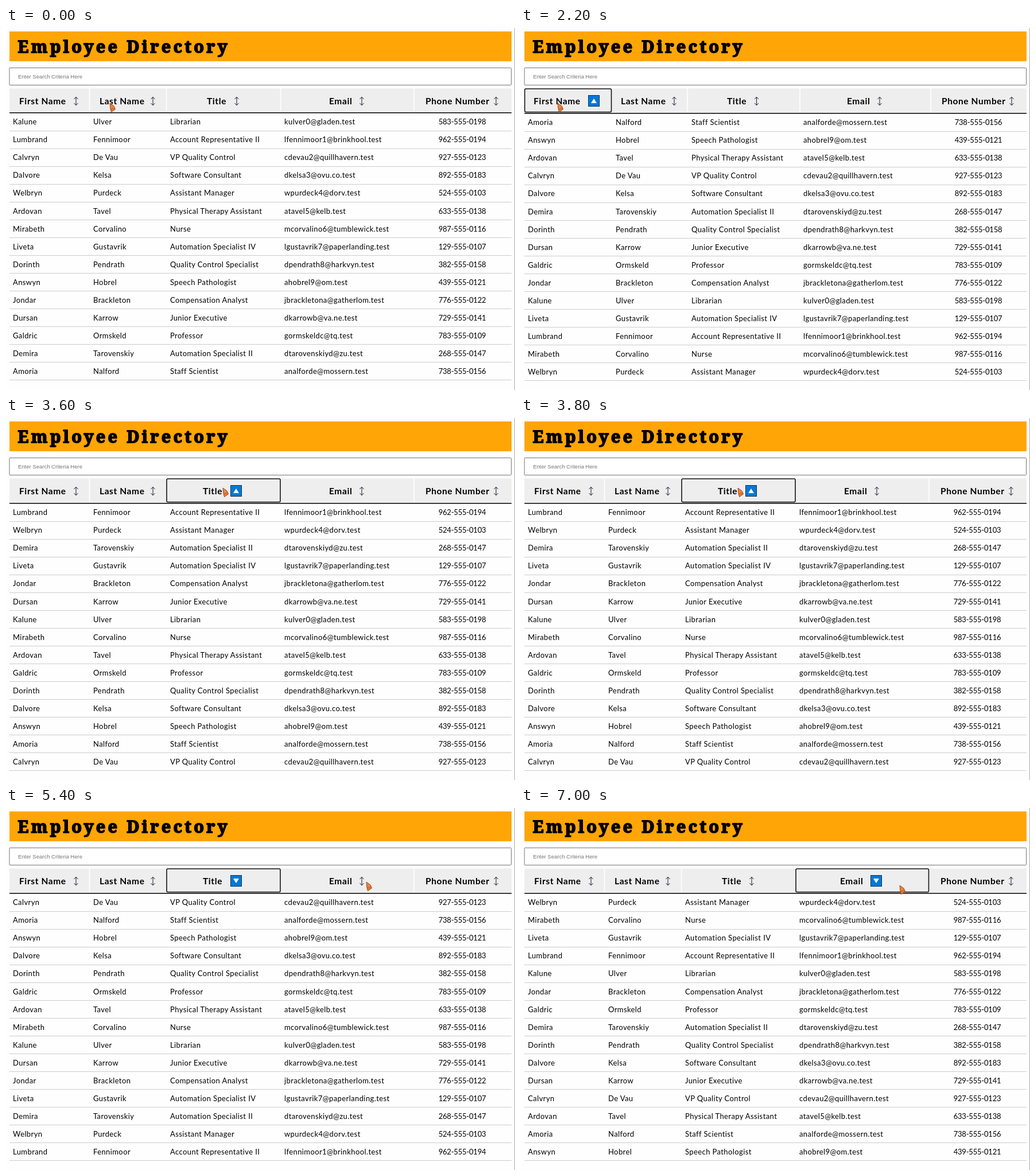
Write an HTML page that moves like this. It is 887 px wide and 631 px high and loops after 8 s.

```html
<!DOCTYPE html>
<html lang="en">
<head>
<meta charset="utf-8">
<title>Employee Directory</title>
<style>
  html, body { margin: 0; width: 100%; height: 100%; overflow: hidden; background: #fefefe; }
  svg { display: block; width: 887px; height: 631px; }
  text { font-family: Lato, sans-serif; fill: #000; white-space: pre; }
  .title { font: 700 29px "Noto Serif", serif; letter-spacing: 4.3px; stroke: #000; stroke-width: 1.8px; stroke-linejoin: round; }
  .hint { font: 9.5px "Liberation Sans", Arial, sans-serif; fill: #757575; }
  .head { font-size: 15.5px; font-weight: 700; letter-spacing: .6px; }
  .cell { font-size: 13px; letter-spacing: .4px; }
  .phone { letter-spacing: -.2px; text-anchor: middle; }
</style>
</head>
<body>
<svg viewBox="0 0 887 631">
  <rect x="6" y="6" width="875" height="52" fill="#ffa505"/>
  <text class="title" x="20.5" y="43">Employee Directory</text>
  <rect x="6" y="69.5" width="874.5" height="30" rx="1" fill="#fff" stroke="#767676"/>
  <text class="hint" x="21" y="87.5">Enter Search Criteria Here</text>
  <rect x="886" width="1" height="631" fill="#aaa"/>
  <g id="table"></g>
  <g id="cursor">
    <path d="M0 0 L7 5 L9.5 10.5 L2.5 15.5 L1 10 Z" fill="#ee843f" stroke="#94481c" stroke-linejoin="round"/>
    <path d="M1 10 L8.5 8 M2 11.5 L9 10" fill="none" stroke="#b85a24" stroke-width=".8"/>
  </g>
</svg>
<script>
const LOOP = 8000, STEP = 200;
const table = document.getElementById('table');
const cursor = document.getElementById('cursor');

// first | last | title | mail host | phone area | phone end
const people = `Kalune|Ulver|Librarian|gladen|583|98
Lumbrand|Fennimoor|Account Representative II|brinkhool|962|94
Calvryn|De Vau|VP Quality Control|quillhavern|927|23
Dalvore|Kelsa|Software Consultant|ovu.co|892|83
Welbryn|Purdeck|Assistant Manager|dorv|524|03
Ardovan|Tavel|Physical Therapy Assistant|kelb|633|38
Mirabeth|Corvalino|Nurse|tumblewick|987|16
Liveta|Gustavrik|Automation Specialist IV|paperlanding|129|07
Dorinth|Pendrath|Quality Control Specialist|harkvyn|382|58
Answyn|Hobrel|Speech Pathologist|om|439|21
Jondar|Brackleton|Compensation Analyst|gatherlom|776|22
Dursan|Karrow|Junior Executive|va.ne|729|41
Galdric|Ormskeld|Professor|tq|783|09
Demira|Tarovenskiy|Automation Specialist II|zu|268|47
Amoria|Nalford|Staff Scientist|mossern|738|56`.split('\n').map((line, i) => {
  const [first, last, title, host, area, end] = line.split('|');
  const user = (first[0] + last).toLowerCase().replace(' ', '') + i.toString(36);
  return [first, last, title, `${user}@${host}.test`, `${area}-555-01${end}`];
});

const names = ['First Name', 'Last Name', 'Title', 'Email', 'Phone Number'];
const normal = {
  edges: [6, 145.5, 279.5, 478.5, 711, 881],
  heads: [23, 163, 350, 563, 731],
  icons: [122, 256, 402, 620, 854],
  cells: [12, 152, 286, 485, 795]
};
const widened = {
  edges: [6, 158, 290, 486, 714, 881],
  heads: [22, 174, 359, 568, 733],
  icons: [127, 267, 410.5, 625, 855],
  cells: [12, 165, 297, 492, 797]
};

// start, focused column, sort direction
const states = [
  [0, -1, 0], [1400, 0, 0], [1600, 0, 1], [2600, 0, -1],
  [3600, 2, 1], [4400, 2, -1], [6000, 3, 1], [6600, 3, -1]
];
// time, x, y of the pointer tip
const path = [
  [0, 181, 131], [1200, 73, 128], [1400, 72, 128], [2200, 64, 131], [3000, 64, 131],
  [3600, 378, 122], [4600, 378, 122], [5400, 628, 129], [6000, 628, 129],
  [6600, 640, 130], [7000, 660, 135], [LOOP, 660, 135]
];

const text = (cls, x, y, s) => `<text class="${cls}" x="${x}" y="${y}">${s}</text>`;
const line = (y, h, color) => `<rect x="6" y="${y}" width="875" height="${h}" fill="${color}"/>`;

const arrows = x => `<path d="M${x} 120.5V134.5m-3.5 -3.5l3.5 3.8l3.5 -3.8m-7 -7l3.5 -3.8l3.5 3.8"
  fill="none" stroke="#21152c"/>`;

const badge = (x, dir) => `<rect x="${x - 9.5}" y="117.5" width="19" height="19" fill="#0078d7" stroke="#12304c"/>
  <path d="M${x - 5} ${127 + 4 * dir}h10l-5 ${-8 * dir}z" fill="#fff"/>`;

function drawTable([, col, dir]) {
  const at = col === 0 && dir ? widened : normal;
  const shift = dir ? 1 : 0;
  let out = line(105.5, 41.5 + shift, '#eee');
  at.edges.slice(1, 5).forEach(x => out += `<rect x="${x - .8}" y="105" width="1.6" height="42" fill="#fff"/>`);
  out += line(147 + shift, 1.5, '#000');

  names.forEach((name, i) => {
    const sorted = dir && i === col;
    const headX = at.heads[i] - (sorted && i ? 7 : 0);
    const iconX = at.icons[i] - (sorted && i ? 1 : 0);
    out += text('head', headX, 132.5, name) + (sorted ? badge(iconX, dir) : arrows(iconX));
  });
  if (col >= 0) {
    const left = at.edges[col] + .5, width = at.edges[col + 1] - left - .5;
    out += `<rect x="${left}" y="106" width="${width}" height="40.5" rx="2" fill="none" stroke="#101010" stroke-width="1.6"/>`;
  }

  const rows = [...people];
  if (dir) rows.sort((a, b) => (a[col] < b[col] ? -1 : 1) * dir);
  rows.forEach((row, r) => {
    const y = Math.round(168.2 + shift + r * 31.07);
    row.forEach((s, i) => out += text(i === 4 ? 'cell phone' : 'cell', at.cells[i], y, s));
    out += line(179 + shift + r * 31, 1, '#ccc');
  });
  table.innerHTML = out;
}

function pointer(t) {
  const i = path.findIndex(p => p[0] > t);
  const [t0, x0, y0] = path[i - 1], [t1, x1, y1] = path[i];
  const k = (t - t0) / (t1 - t0);
  return [x0 + (x1 - x0) * k, y0 + (y1 - y0) * k];
}

let shown;
function frame() {
  const t = Math.floor(performance.now() % LOOP / STEP) * STEP;
  const state = states.filter(s => s[0] <= t).pop();
  if (state !== shown) drawTable(shown = state);
  cursor.setAttribute('transform', `translate(${pointer(t)})`);
  requestAnimationFrame(frame);
}
frame();
</script>
</body>
</html>
```
